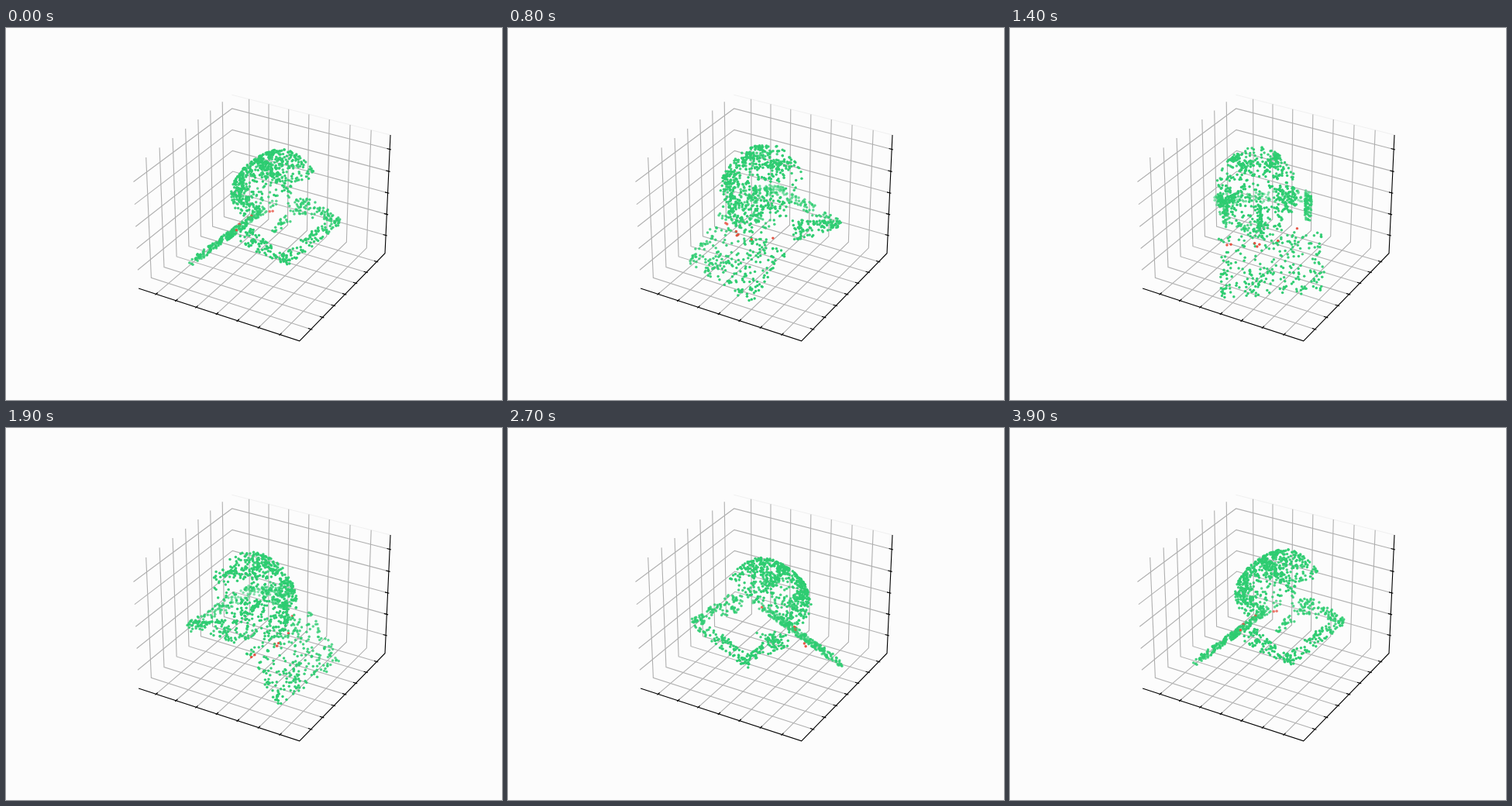
Recreate the animation shown at these times as an HTML page with a canvas. Size 640 by 480 pixels, loop 4000 ms.

```html
<!DOCTYPE html>
<html lang="en">
<head>
<meta charset="utf-8">
<title>Rotating point cloud</title>
<style>
  html, body { margin: 0; width: 640px; height: 480px; overflow: hidden; background: #fcfcfc; }
  canvas { display: block; }
</style>
</head>
<body>
<canvas id="stage" width="640" height="480"></canvas>
<script>
const ctx = document.getElementById('stage').getContext('2d');
const STEP = 100, STEPS = 40;
const GREEN = '#2ecc71', RED = '#e74c3c';
const H = 0.59524, HZ = 0.44643;   // half sizes of the axes box
const LINE = 1.11, DOT = 1.74;

// Perspective camera: u = right, f = away along the floor, z = up.
function project(u, f, z) {
  const near = -0.866 * f + 0.5 * z;
  const k = 1997.8 / (10 - near);
  return [333 + u * k, 237.4 - (0.5 * f + 0.866 * z) * k, near];
}

const project3 = (x, y, z) => project(0.866 * x + 0.5 * y, -0.5 * x + 0.866 * y, z);

function line(g, color, ...points) {
  g.strokeStyle = color;
  g.lineWidth = LINE;
  g.beginPath();
  for (const p of points) {
    const [x, y] = project3(...p);
    g.lineTo(x, y);
  }
  g.stroke();
}

function drawAxes(g) {
  const ticks = (n, first, gap, half) =>
    Array.from({ length: n }, (_, i) => (2 * (first + gap * i) - 1) * half);
  const xs = ticks(7, 0.113, 0.1285, H);
  const ys = ticks(7, 0.124, 0.1287, H);
  const zs = ticks(5, 0.158, 0.1815, HZ);
  const grid = '#b0b0b0', out = 0.01, inn = 0.02;

  line(g, '#f0f0f0', [-H, H, HZ], [H, H, HZ]);
  for (const x of xs) line(g, grid, [x, -H, -HZ], [x, H, -HZ], [x, H, HZ]);
  for (const y of ys) line(g, grid, [H, y, -HZ], [-H, y, -HZ], [-H, y, HZ]);
  for (const z of zs) line(g, grid, [-H, -H, z], [-H, H, z], [H, H, z]);

  line(g, '#000', [-H, -H, -HZ], [H, -H, -HZ], [H, H, -HZ], [H, H, HZ]);
  for (const x of xs) line(g, '#000', [x, -H - out, -HZ], [x, -H + inn, -HZ]);
  for (const y of ys) line(g, '#000', [H + out, y, -HZ], [H - inn, y, -HZ]);
  for (const z of zs) line(g, '#000', [H + out, H, z], [H - inn, H, z]);
}

let seed = 20;
function rand() {
  seed = (seed + 0x6d2b79f5) | 0;
  let t = Math.imul(seed ^ (seed >>> 15), 1 | seed);
  t = (t + Math.imul(t ^ (t >>> 7), 61 | t)) ^ t;
  return ((t ^ (t >>> 14)) >>> 0) / 4294967296;
}
const between = (a, b) => a + (b - a) * rand();
const repeat = (count, fn) => { for (let i = 0; i < count; i++) fn(i); };

// The cap lies tilted: e = across, t = from peak to back, n = towards the crown.
const cloud = [];
function add(e, t, n, color = GREEN) {
  cloud.push({
    u: 0.566 * e + 0.578 * t - 0.588 * n,
    f: 0.825 * e - 0.397 * t + 0.404 * n,
    z: 0.713 * t + 0.701 * n,
    color
  });
}

function crownPoint() {
  let a = between(0, 2 * Math.PI);
  a += 0.17 * Math.sin(5 * a);
  const h = Math.pow(rand(), 0.62);
  const r = Math.pow(1 - Math.pow(h, 3), 0.4) * (1 - 0.4 * Math.pow(rand(), 1.5));
  add(0.07 + 0.265 * r * Math.sin(a), 0.115 + 0.295 * r * Math.cos(a), 0.31 * h);
}

function peakPoint() {
  add(between(-0.335, 0.335), between(-0.55, -0.15), between(-0.01, 0.034));
}

// Ear pieces: wedges that run down to the two rear corners.
function earPoint(i) {
  const p = rand();
  const h = 0.7 * between(0, 0.18 - 0.15 * p);
  const e = (0.28 + 0.05 * p) * (1 - 0.15 * rand());
  add(i % 2 ? e : -e, -0.08 + 0.28 * p + h, -0.08 - 0.27 * p + h);
}

function rearPoint() {
  add(between(-0.33, 0.33), between(0.15, 0.22), between(-0.36, -0.28));
}

function bucklePoint() {
  add(between(0, 0.2), between(-0.09, -0.02), between(-0.16, -0.1));
}

repeat(600, crownPoint);
repeat(255, peakPoint);
repeat(190, earPoint);
repeat(85, rearPoint);
repeat(22, bucklePoint);
[[-0.18, -0.12, 0.01], [-0.05, -0.2, 0.03], [0.07, -0.22, 0.03], [0.085, -0.23, 0.02],
 [0.1, -0.21, 0.03], [0.25, -0.2, -0.02], [0.275, -0.2, -0.03]]
  .forEach(p => add(...p, RED));

const axes = document.createElement('canvas');
axes.width = 640;
axes.height = 480;
drawAxes(axes.getContext('2d'));

function drawCloud(angle) {
  const c = Math.cos(angle), s = Math.sin(angle);
  const dots = cloud.map(p => {
    const [x, y, near] = project(p.u * c - p.f * s, p.u * s + p.f * c, p.z);
    return { x, y, near, color: p.color };
  }).sort((a, b) => a.near - b.near);
  const far = dots[0].near, span = dots[dots.length - 1].near - far;

  for (const d of dots) {
    const fade = 0.7 * (1 - (d.near - far) / span);
    ctx.globalAlpha = 1 - fade * fade;
    ctx.fillStyle = d.color;
    ctx.beginPath();
    ctx.arc(d.x, d.y, DOT, 0, 2 * Math.PI);
    ctx.fill();
  }
  ctx.globalAlpha = 1;
}

let shown = -1;
function render(now) {
  const step = Math.floor(now / STEP) % STEPS;
  if (step !== shown) {
    shown = step;
    ctx.fillStyle = '#fcfcfc';
    ctx.fillRect(0, 0, 640, 480);
    ctx.drawImage(axes, 0, 0);
    drawCloud(2 * Math.PI * step / (STEPS - 1));
  }
}

const start = performance.now();
function loop() {
  render(performance.now() - start);
  requestAnimationFrame(loop);
}
loop();
</script>
</body>
</html>
```
